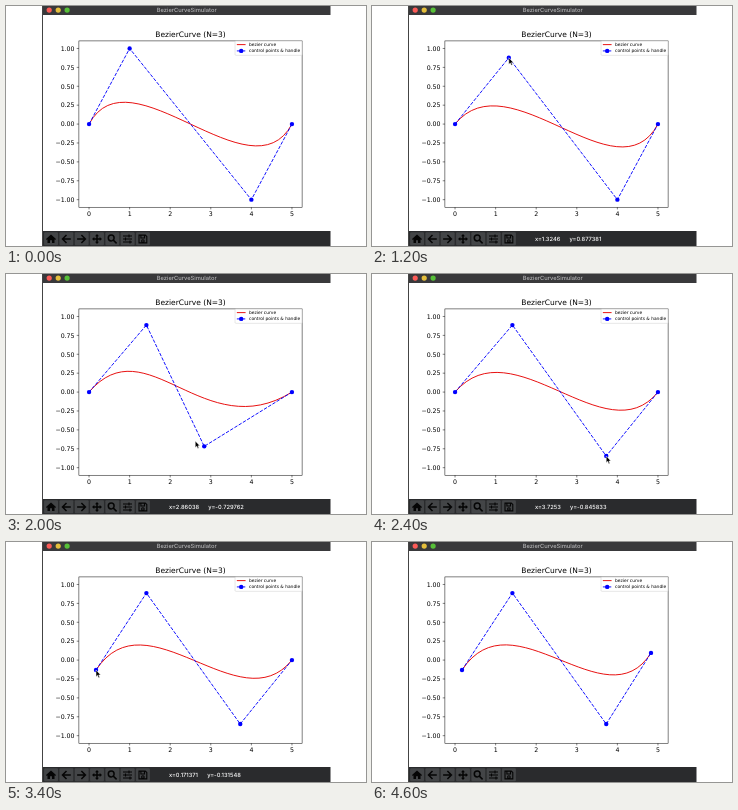
Write an HTML page that moves like this. It is 360 px wide and 240 px high and loops after 4800 ms.

```html
<!DOCTYPE html>
<html lang="en">
<head>
<meta charset="utf-8">
<title>Bezier curve simulator</title>
<style>
  html, body { margin: 0; width: 100%; height: 100%; overflow: hidden; background: #fff; }
  svg { display: block; width: 360px; height: 240px; text-rendering: geometricPrecision; }
  .ui { font: 500 5.75px Inter, "Liberation Sans", sans-serif; white-space: pre; }
  .plot { font: 13.89px "DejaVu Sans", sans-serif; }
  .plot .title { font-size: 16.67px; }
  .plot .key { font-size: 9.72px; }
  .axis { fill: none; stroke: #000; stroke-width: 1.11; }
  .curve { fill: none; stroke: #e60000; stroke-width: 2.08; }
  .handle { fill: none; stroke: #00f; stroke-width: 2.08; stroke-dasharray: 7.7 3.33; }
  .dot { fill: #00f; }
  .icon { fill: none; stroke: #050505; stroke-width: 1.5; }
  .icon .solid { fill: #050505; stroke: none; }
</style>
</head>
<body>
<svg viewBox="0 0 360 240">
  <rect x="36" width="1" height="240" fill="#444"/>
  <rect x="37" width="287.5" height="9" fill="#39393b"/>
  <circle cx="43.2" cy="4.1" r="2.6" fill="#fc5b57"/>
  <circle cx="52.2" cy="4.1" r="2.6" fill="#e5bf3c"/>
  <circle cx="61.1" cy="4.1" r="2.6" fill="#57c038"/>
  <text class="ui" x="180.7" y="6.2" text-anchor="middle" fill="#b4b4b6">BezierCurveSimulator</text>

  <!-- Figure units: 640 x 480 -->
  <g class="plot" transform="translate(36.9 9) scale(.45)">
    <g id="ticks"></g>
    <text class="title" x="328" y="49.3" text-anchor="middle">BezierCurve (N=3)</text>
    <path id="curve" class="curve"/>
    <path id="handle" class="handle"/>
    <g id="dots"></g>
    <rect class="axis" x="80" y="57.6" width="496" height="369.6"/>
    <rect x="427" y="57.6" width="149" height="32" rx="2" fill="#fff" fill-opacity=".8" stroke="#ccc" stroke-opacity=".8" stroke-width="1.39"/>
    <path class="curve" d="M431 65.8h19.4"/>
    <path class="handle" d="M431 79.8h19.4"/>
    <circle class="dot" cx="440.7" cy="79.8" r="4.86"/>
    <text class="key" x="458" y="69">bezier curve</text>
    <text class="key" x="458" y="83.2">control points &amp; handle</text>
  </g>

  <rect x="37" y="225" width="287.5" height="15" fill="#2a2b2d"/>
  <g id="buttons" fill="#434547"></g>
  <g class="icon">
    <path class="solid" transform="translate(45 233)" d="M0-4.6 5 0 4.2.9 3.5.3V4H1V1.3H-1V4H-3.5V.3L-4.2.9-5 0Z"/>
    <path transform="translate(60.3 233)" d="M4.5 0H-3.5M.2-4-3.8 0 .2 4"/>
    <path transform="translate(75.6 233)" d="M-4.5 0H3.5M-.2-4 3.8 0-.2 4"/>
    <g transform="translate(91 233)">
      <path d="M-4 0H4M0-4V4"/>
      <path class="solid" d="M0-5 2-2.7H-2ZM0 5 2 2.7H-2ZM-5 0-2.7-2V2ZM5 0 2.7-2V2Z"/>
    </g>
    <path transform="translate(106.2 233)" d="M1.9-1a2.9 2.9 0 1 1-5.8 0a2.9 2.9 0 1 1 5.8 0M1.1 1.1 4.4 4.4"/>
    <path transform="translate(121.5 233)" stroke-width="1.1" d="M-4.5-3H4.5M-4.5 0H4.5M-4.5 3H4.5M1.5-4.4V-1.6M-2-1.4V1.4M2.5 1.6V4.4"/>
    <path transform="translate(136.9 233)" stroke-width="1.1" d="M-3.9-3.9H2.4L3.9-2.4V3.9H-3.9ZM-2-3.6V-1H1.6V-3.6M-1.3 2a1.3 1.3 0 1 1 2.6 0a1.3 1.3 0 1 1-2.6 0"/>
  </g>
  <text id="status" class="ui" x="163" y="235.2" fill="#fff"></text>
  <path id="cursor" d="M0 0V6.6L1.5 5.3 2.5 7.6 3.7 7.1 2.7 4.9H4.7Z" fill="#000" stroke="#fff" stroke-width=".5"/>
</svg>
<script>
const STEP = 200, LOOP = 4800;
const $ = id => document.getElementById(id);

// Data coordinates to figure pixels (y up) and back
const toFig = (x, y) => [80 + (x + .25) * 496 / 5.5, 52.8 + (y + 1.1) * 369.6 / 2.2];
const toData = (x, y) => [(x - 80) * 5.5 / 496 - .25, (y - 52.8) * 2.2 / 369.6 - 1.1];
const flip = ([x, y]) => [x, 480 - y];
const start = [[0, 0], [1, 1], [4, -1], [5, 0]].map(p => toFig(...p));

// Mouse readings; grab: dragged point, lag: point offset, lead: cursor offset
const moves = [
  { at: 3, pos: [245, 330] },
  { at: 4, pos: [192.5, 403] },
  { at: 5, pos: [200, 395], grab: 1 },
  { at: 6, pos: [222, 385], grab: 1 },
  { at: 7, pos: [230, 386.5], grab: 1 },
  { at: 8, pos: [448, 78], grab: 2 },
  { at: 9, pos: [412, 100], grab: 2, lead: [-10, 3] },
  { at: 10, pos: [360.5, 115], grab: 2, lag: [-2, 2], lead: [-22, 14] },
  { at: 11, pos: [345, 134], grab: 2 },
  { at: 12, pos: [438.5, 95.5], grab: 2 },
  { at: 13, pos: [250, 190] },
  { at: 14, pos: [106, 243], grab: 0 },
  { at: 15, pos: [157, 277.5], grab: 0, lag: [14.5, 0], lead: [32, -9] },
  { at: 16, pos: [145, 235], grab: 0 },
  { at: 17, pos: [118, 215.5], grab: 0 },
  { at: 18, pos: [545, 240] },
  { at: 19, pos: [479, 295.5], grab: 3, lead: [-13, 2] },
  { at: 20, pos: [514, 268], grab: 3 },
  { at: 21, pos: [538, 253.5], grab: 3 }
];

const add = ([x, y], [dx, dy] = [0, 0]) => [x + dx, y + dy];
const short = v => String(parseFloat(v.toPrecision(6)));
const minus = s => s.replace("-", "\u2212");

function buildTicks() {
  let out = "";
  for (let i = 0; i <= 5; i++) {
    const [x] = toFig(i, 0);
    out += `<path class="axis" d="M${x} 427.2v4.86"/><text x="${x}" y="447.5" text-anchor="middle">${i}</text>`;
  }
  for (let i = -4; i <= 4; i++) {
    const y = 480 - toFig(0, i / 4)[1];
    out += `<path class="axis" d="M80 ${y}h-4.86"/><text x="70.3" y="${y + 5.06}" text-anchor="end">${minus((i / 4).toFixed(2))}</text>`;
  }
  $("ticks").innerHTML = out;
  $("dots").innerHTML = '<circle class="dot" r="4.86"/>'.repeat(4);
  let buttons = "";
  for (let i = 0; i < 7; i++) buttons += `<rect x="${38.1 + i * 15.32}" y="226.2" width="13.9" height="13" rx="1"/>`;
  $("buttons").innerHTML = buttons;
}

function draw(step) {
  const points = start.slice();
  let mouse = null;
  for (const m of moves) {
    if (m.at > step) break;
    if (m.grab !== undefined) points[m.grab] = add(m.pos, m.lag);
    mouse = m.at === step ? m : null;
  }
  const [a, b, c, d] = points.map(flip);
  $("curve").setAttribute("d", `M${a}C${b} ${c} ${d}`);
  $("handle").setAttribute("d", `M${a}L${b} ${c} ${d}`);
  [a, b, c, d].forEach(([x, y], i) => {
    const dot = $("dots").children[i];
    dot.setAttribute("cx", x);
    dot.setAttribute("cy", y);
  });
  $("cursor").style.display = mouse ? "" : "none";
  $("status").textContent = "";
  if (!mouse) return;
  const [x, y] = toData(...mouse.pos);
  $("status").textContent = `x=${short(x)}      y=${short(y)}`;
  const [cx, cy] = flip(add(mouse.pos, mouse.lead));
  $("cursor").setAttribute("transform", `translate(${36.9 + cx * .45} ${9 + cy * .45})`);
}

buildTicks();
draw(0);
let shown = 0;
const begin = performance.now();
function tick() {
  const step = Math.floor((performance.now() - begin) % LOOP / STEP);
  if (step !== shown) draw(shown = step);
  requestAnimationFrame(tick);
}
requestAnimationFrame(tick);
</script>
</body>
</html>
```
